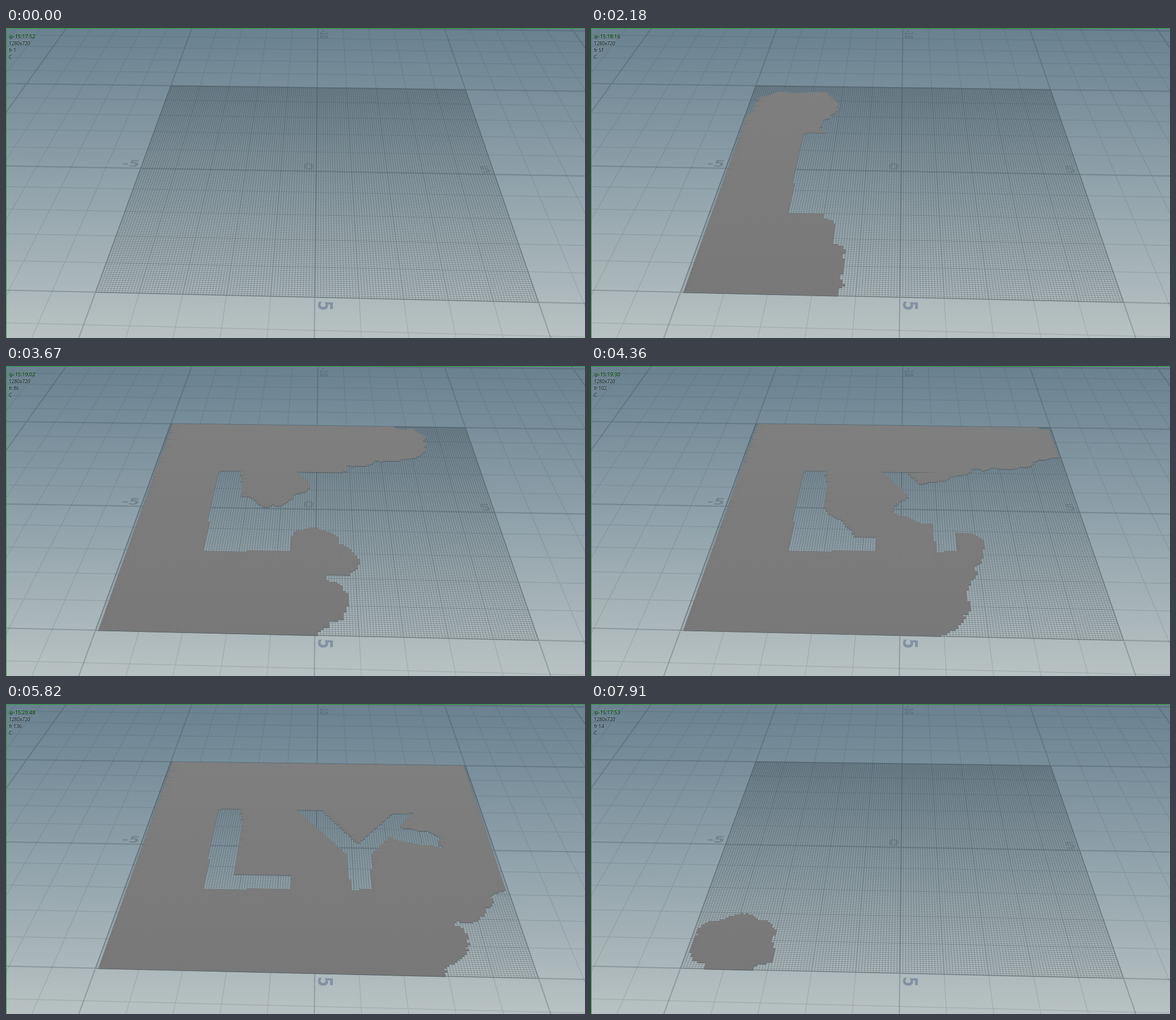
Write an HTML page with a canvas that moves like this. It is 1022 px wide and 548 px high and loops after 7.98 s.

```html
<!DOCTYPE html>
<html lang="en">
<head>
<meta charset="utf-8">
<title>Spreading fill</title>
<style>
  html, body { margin: 0; height: 100%; overflow: hidden; background: #8fa0a8; }
  canvas { display: block; width: 100vw; height: 100vh; }
</style>
</head>
<body>
<canvas id="stage" width="1022" height="548"></canvas>
<script>
const W = 1022, H = 548, N = 150;
const LOOP = 7980, PICTURES = 115, SIM_FRAMES = 170;
const CREEP = 0.6; // cells covered per simulation frame
const ctx = document.getElementById('stage').getContext('2d');

// Perspective: the unit square (u right, v towards the viewer) onto the sheet.
const project = (() => {
  const [x0, y0, x1, y1, x2, y2, x3, y3] = [291, 102, 811, 109, 940, 485, 158, 467];
  const sx = x0 - x1 + x2 - x3, sy = y0 - y1 + y2 - y3;
  const ax = x1 - x2, ay = y1 - y2, bx = x3 - x2, by = y3 - y2;
  const det = ax * by - bx * ay;
  const g = (sx * by - bx * sy) / det, h = (ax * sy - sx * ay) / det;
  return (u, v) => {
    const w = 1 + g * u + h * v;
    return [
      ((x1 - x0 + g * x1) * u + (x3 - x0 + h * x3) * v + x0) / w,
      ((y1 - y0 + g * y1) * u + (y3 - y0 + h * y3) * v + y0) / w
    ];
  };
})();
const ground = (x, z) => project((x + 5) / 10, (z + 5) / 10);

function line(c, a, b) {
  c.moveTo(...a);
  c.lineTo(...b);
}

function strokeLines(c, color, width, build) {
  c.beginPath();
  build();
  c.strokeStyle = color;
  c.lineWidth = width;
  c.stroke();
}

// Text lying flat on the ground plane.
function groundLabel(c, text, x, z, color, align, angle = 0) {
  const o = ground(x, z), e = 0.05;
  const px = ground(x + e, z), pz = ground(x, z + e);
  const k = 1 / (e * 100);
  c.save();
  c.setTransform((px[0] - o[0]) * k, (px[1] - o[1]) * k,
                 (pz[0] - o[0]) * k, (pz[1] - o[1]) * k, o[0], o[1]);
  c.rotate(angle);
  c.font = 'bold 45px "DejaVu Sans", sans-serif';
  c.textAlign = align;
  c.fillStyle = color;
  c.fillText(text, 0, 0);
  c.restore();
}

function paintBackdrop() {
  const canvas = document.createElement('canvas');
  canvas.width = W;
  canvas.height = H;
  const c = canvas.getContext('2d');
  const sky = c.createLinearGradient(0, 0, 0, H);
  sky.addColorStop(0, '#6a8190');
  sky.addColorStop(0.5, '#90a2ab');
  sky.addColorStop(1, '#b8c2c2');
  c.fillStyle = sky;
  c.fillRect(0, 0, W, H);

  const gridLines = major => () => {
    for (let i = -18; i <= 18; i++) {
      if ((i % 5 === 0) !== major) continue;
      line(c, ground(i, -12), ground(i, 9));
      if (i > -13 && i < 9) line(c, ground(-18, i), ground(18, i));
    }
  };
  strokeLines(c, 'rgba(58,72,80,.18)', 1.2, gridLines(false));
  strokeLines(c, 'rgba(58,72,80,.27)', 2.2, gridLines(true));

  groundLabel(c, '-5', -5.08, -0.08, '#74838b', 'right');
  groundLabel(c, '0', -0.06, -0.08, 'rgba(90,105,113,.3)', 'right');
  groundLabel(c, '5', 4.94, -0.08, 'rgba(90,105,113,.3)', 'right');
  groundLabel(c, '5', 0.08, 5.1, '#8292a3', 'left', Math.PI / 2);
  groundLabel(c, '-10', 0.08, -9.8, '#5d7280', 'left', Math.PI / 2);

  const mesh = 'rgba(38,46,50,.36)';
  strokeLines(c, mesh, 0.7, () => {
    for (let i = 0; i <= N; i++) line(c, project(i / N, 0), project(i / N, 1));
  });
  strokeLines(c, mesh, 0.8, () => {
    for (let i = 0; i <= N; i++) line(c, project(0, i / N), project(1, i / N));
  });

  c.fillStyle = '#1fa32b';
  c.fillRect(0, 0, W, 1);
  c.fillRect(0, 0, 1, H);
  return canvas;
}

// The two letters stay bare.
const letters = [
  'M376 186H412L417 205 402 302H502V327H347Z',
  'M514 188H558L621 247 682 194 718 193 645 266V328H608L604 268Z'
].map(d => new Path2D(d));

// Brushes that lead the spread: key points are x, y, simulation frame.
const brushes = [
  { radius: 40, path: [[250, 425, 2], [260, 400, 14], [318, 226, 29], [340, 150, 43],
    [395, 138, 51], [700, 138, 86], [790, 140, 100], [800, 165, 118], [850, 310, 136], [910, 465, 169]] },
  { radius: 60, path: [[300, 420, 29], [390, 412, 51], [545, 415, 86], [670, 415, 118], [850, 430, 157]] },
  { radius: 35, path: [[520, 340, 78], [545, 312, 83], [605, 360, 87], [680, 300, 108], [775, 340, 118]] },
  { radius: 40, path: [[460, 160, 58], [470, 222, 86], [490, 275, 104]] }
];

const lerp = (a, b, t) => a + (b - a) * t;

const hash = (x, y) => {
  const s = Math.sin(x * 127.1 + y * 311.7) * 43758.5453;
  return s - Math.floor(s);
};

function noise(x, y) {
  const i = Math.floor(x), j = Math.floor(y), fx = x - i, fy = y - j;
  return lerp(lerp(hash(i, j), hash(i + 1, j), fx),
              lerp(hash(i, j + 1), hash(i + 1, j + 1), fx), fy);
}

function meshCells() {
  return Array.from({ length: N * N }, (_, k) => {
    const i = k % N, j = Math.floor(k / N);
    const [x, y] = project((i + 0.5) / N, (j + 0.5) / N);
    const open = i > 0 && i < N - 1 && !letters.some(p => ctx.isPointInPath(p, x, y));
    return { x, y, open, rough: 0.5 + noise(i / 3.5, j / 3.5), time: Infinity };
  });
}

function stamp(cells, x, y, radius, time) {
  for (const cell of cells) {
    if (!cell.open || cell.time <= time) continue;
    const reach = radius * (1.15 - 0.3 * (cell.rough - 0.5));
    if (Math.hypot(cell.x - x, (cell.y - y) * 1.5) < reach) cell.time = time;
  }
}

// Every covered cell creeps on to its neighbours, around the letters.
function creep(cells) {
  const near = [-1, 0, 1].flatMap(dy => [-1, 0, 1].map(dx => [dy * N + dx, Math.hypot(dx, dy)]));
  const relax = k => {
    const cell = cells[k];
    if (!cell.open) return;
    for (const [offset, step] of near) {
      const other = cells[k + offset];
      if (other?.open) cell.time = Math.min(cell.time, other.time + step * cell.rough / CREEP);
    }
  };
  for (let pass = 0; pass < 5; pass++) {
    for (let k = 0; k < N * N; k++) relax(k);
    for (let k = N * N - 1; k >= 0; k--) relax(k);
  }
}

function arrivalTimes() {
  const cells = meshCells();
  for (const { radius, path } of brushes) {
    for (let n = 1; n < path.length; n++) {
      const [ax, ay, from] = path[n - 1], [bx, by, to] = path[n];
      for (let t = from; t <= to; t += 0.5) {
        const f = (t - from) / (to - from);
        stamp(cells, lerp(ax, bx, f), lerp(ay, by, f), radius, t);
      }
    }
  }
  creep(cells);
  return cells.map(cell => cell.time);
}

function coveredPath(frame) {
  const path = new Path2D();
  for (let j = 0; j < N; j++) {
    for (let i = 0; i < N; i++) {
      if (arrival[j * N + i] > frame) continue;
      const start = i;
      while (i < N && arrival[j * N + i] <= frame) i++;
      const top = j / N, bottom = (j + 1.08) / N;
      path.moveTo(...project(start / N, top));
      path.lineTo(...project(i / N, top));
      path.lineTo(...project(i / N, bottom));
      path.lineTo(...project(start / N, bottom));
      path.closePath();
    }
  }
  return path;
}

function simFrame(t) {
  const picture = Math.floor(t / LOOP * PICTURES + 0.3);
  return 1 + Math.round(picture * 1.6 + 0.45) % SIM_FRAMES;
}

// Each simulation frame takes longer than the one before.
function clockText(frame) {
  const s = 17 * 60 + 52 + Math.floor(0.0097 * (frame - 1) ** 2);
  const two = n => String(n).padStart(2, '0');
  return `15:${two(Math.floor(s / 60))}:${two(s % 60)}`;
}

function overlayText(text, y, size, glow) {
  ctx.font = `${size}px "Open Sans", "Noto Sans", sans-serif`;
  ctx.fillStyle = glow;
  ctx.fillText(text, 4.4, y - 0.6);
  ctx.fillStyle = '#0b1210';
  ctx.fillText(text, 5, y);
}

const backdrop = paintBackdrop();
const arrival = arrivalTimes();
const gray = ctx.createLinearGradient(0, 100, 0, 485);
gray.addColorStop(0, '#7f7f7f');
gray.addColorStop(1, '#787878');

function draw(frame) {
  ctx.drawImage(backdrop, 0, 0);
  const covered = coveredPath(frame);
  ctx.save();
  ctx.translate(0, 0.9);
  ctx.fillStyle = '#505a5f';
  ctx.fill(covered);
  ctx.restore();
  ctx.fillStyle = gray;
  ctx.fill(covered);

  overlayText('ip-' + clockText(frame), 17.5, 9, '#5fd06a');
  overlayText('1280x720', 30, 8.3, '#a9bcc4');
  overlayText('fr ' + frame, 42, 8.3, '#a9bcc4');
  overlayText('C', 54, 8.3, '#a9bcc4');
}

let shown = 0;
const startTime = performance.now();
function tick() {
  const frame = simFrame((performance.now() - startTime) % LOOP);
  if (frame !== shown) draw(shown = frame);
  requestAnimationFrame(tick);
}
tick();
</script>
</body>
</html>
```
